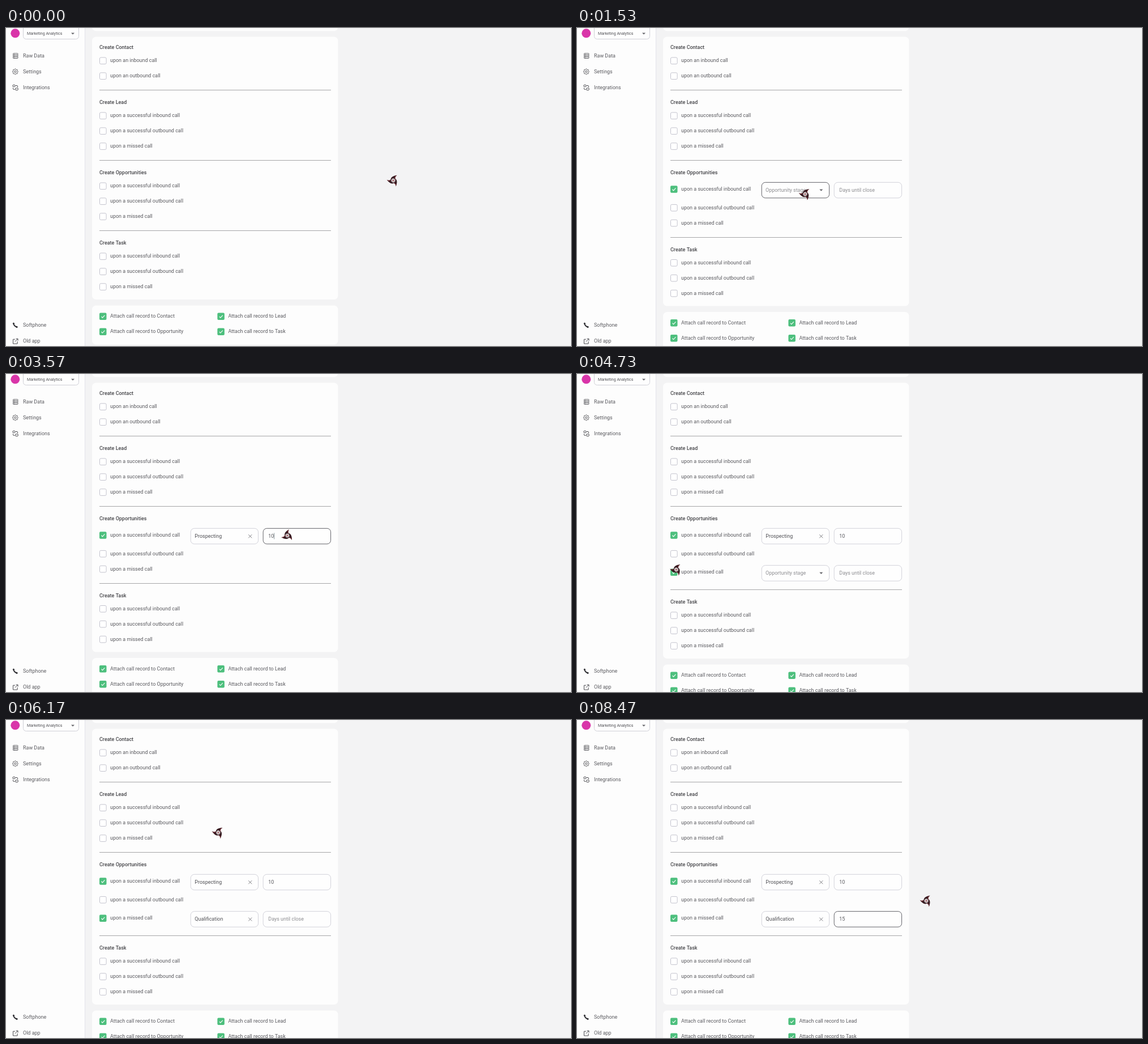
An HTML page with a canvas for the animation above (8.53 s loop, 998 by 561 pixels).

```html
<!DOCTYPE html>
<html lang="en">
<head>
<meta charset="utf-8">
<title>Call automation settings</title>
<style>
html, body { margin: 0; width: 100%; height: 100%; overflow: hidden; background: #f3f3f4; }
canvas { display: block; }
</style>
</head>
<body>
<canvas id="stage" width="998" height="561"></canvas>
<script>
const ctx = document.getElementById('stage').getContext('2d');
const LOOP = 8530;
const GROW = 11.5;
const PAGE = '#f3f3f4', CARD = '#fdfdfd';
const LABEL = '#5a5a5f', TITLE = '#454549', HINT = '#8c8c90';
const LINE = '#d2d2da', FOCUS = '#626268', GREEN = '#4dbf7d';
const STAGES = ['Prospecting', 'Qualification', 'Proposal/Price Qu…', 'Value Proposition',
  'Closed Lost', 'Closed Won', 'Id. Decision Makers', 'Needs Analysis'];
const OUTCOMES = ['upon a successful inbound call', 'upon a successful outbound call', 'upon a missed call'];

// time, x, y, angle in degrees
const POINTER = [
  [30, 684, 269, 0], [800, 171, 280, 240], [900, 171, 280, 240], [1400, 403, 293, 365],
  [1700, 403, 293, 365], [2250, 381, 365, 480], [2370, 381, 367, 480], [2550, 381, 367, 480],
  [2980, 497, 285, 580], [3770, 497, 285, 580], [4560, 171, 345, 840], [4680, 171, 345, 840],
  [5300, 396, 349, 955], [5500, 396, 349, 955], [5950, 367, 188, 1080], [6100, 367, 188, 1080],
  [6560, 490, 352, 1180], [7300, 490, 352, 1180], [8130, 617, 319, 1440]
];

const fields = [
  { checked: 820, focus: 1450, open: 1600, picked: 2340, days: 3000, typed: [3370, 3480],
    blur: 4630, stage: 'Prospecting', value: '10', caretOff: 4630 },
  { checked: 4630, focus: 5250, open: 5400, picked: 6050, days: 6600, typed: [8130, 8240],
    blur: LOOP, stage: 'Qualification', value: '15', caretOff: 8440 }
];

const within = (t, from, to) => t >= from && t < to;

function text(str, x, y, color = LABEL, weight = 400, size = 8.97) {
  ctx.font = `${weight} ${size}px Roboto, sans-serif`;
  ctx.fillStyle = color;
  ctx.fillText(str, x, y + size * 0.355);
}

function box(x, y, w, h, r, fill, stroke) {
  ctx.beginPath();
  ctx.roundRect(x, y, w, h, r);
  if (fill) { ctx.fillStyle = fill; ctx.fill(); }
  if (stroke) { ctx.strokeStyle = stroke; ctx.lineWidth = 1; ctx.stroke(); }
}

function disc(x, y, r, color) {
  ctx.fillStyle = color;
  ctx.beginPath();
  ctx.arc(x, y, r, 0, 7);
  ctx.fill();
}

function stroke(path, color = '#4c4c51', width = 1) {
  ctx.strokeStyle = color;
  ctx.lineWidth = width;
  ctx.stroke(new Path2D(path));
}

function triangle(x, y, up) {
  const d = up ? -1.6 : 1.6;
  ctx.fillStyle = '#67676c';
  ctx.beginPath();
  ctx.moveTo(x - 3, y - d);
  ctx.lineTo(x + 3, y - d);
  ctx.lineTo(x, y + d);
  ctx.fill();
}

function caret(x, y, color = '#8d9a9e') {
  ctx.fillStyle = color;
  ctx.fillRect(x, y - 5.5, 1, 11);
}

function checkbox(x, y, checked) {
  if (checked) {
    box(x, y - 6, 12.5, 12.5, 2, GREEN);
    stroke(`M${x + 3.4} ${y + 0.4}l2 2.2 4-4.4`, '#fff', 1.1);
  } else {
    box(x + 0.5, y - 5.5, 11.6, 11.6, 2, '#fff', '#c3c3cd');
  }
}

function option(label, y, checked, x = 165) {
  checkbox(x, y + 0.4, checked);
  text(label, x + 19, y);
}

function rule(y) {
  ctx.fillStyle = '#a6a6a8';
  ctx.fillRect(165, Math.round(y - 0.5), 409, 1);
}

function sidebar() {
  ctx.fillStyle = CARD;
  ctx.fillRect(0, 0, 139, 561);
  ctx.fillStyle = '#e3e3ea';
  ctx.fillRect(139, 0, 1, 561);

  disc(16.3, 9.3, 8, '#d935a9');

  box(30.5, -8, 98, 27.5, 5, '#fefefe', '#cfcfd6');
  text('Marketing Analytics', 37, 9, '#505055', 400, 7.1);
  triangle(118, 10);
  [['Raw Data', 48.7], ['Settings', 76.7], ['Integrations', 104.7], ['Softphone', 524], ['Old app', 552]]
    .forEach(([label, y]) => text(label, 30, y));

  for (let i = 0; i < 3; i++) {
    box(12.5, 44.8 + i * 3, 8.5, 2.7, 0.7, null, '#5a5a5f');
    ctx.fillStyle = '#5a5a5f';
    ctx.fillRect(14, 45.6 + i * 3, 1, 1);
  }

  ctx.beginPath();
  for (let i = 0; i <= 48; i++) {
    const a = i / 48 * Math.PI * 2, r = 4.4 + 0.7 * Math.cos(a * 8);
    ctx.lineTo(16.4 + r * Math.cos(a), 77 + r * Math.sin(a));
  }
  ctx.moveTo(18.1, 77);
  ctx.arc(16.4, 77, 1.7, 0, 7);
  ctx.strokeStyle = '#4c4c51';
  ctx.lineWidth = 0.9;
  ctx.stroke();

  box(11.8, 100.5, 4.4, 3, 1, null, '#4c4c51');
  box(16.5, 106, 4.8, 3.6, 1, null, '#4c4c51');
  stroke('M17 101.5h2q1.6 0 1.6 1.6v1.6M15.5 108.5h-1.4q-1.6 0-1.6-1.6v-1.6');

  stroke('M13 520.8q1 5 6.3 7.1', '#2e2e32', 1.8);
  stroke('M12.6 520.2l1.8 2.2M17.8 526.7l2.5 1.4', '#2e2e32', 2.6);

  stroke('M16 549.2h-3.5v7.8h7.6v-4M17.6 548.2h3.4v3.4M20.8 548.4l-5 5');
}

function selectField(f, t, y) {
  const open = within(t, f.open, f.picked);
  box(326.2, y - 13.5, 119.4, 27.5, 6.5, '#fefefe', within(t, f.focus, f.picked) ? FOCUS : LINE);
  if (t >= f.picked) {
    text(f.stage, 333.3, y, '#505055');
    stroke(`M428.3 ${y - 2.6}l6 6m0-6l-6 6`, '#717176', 0.9);
  } else {
    text('Opportunity stage', 333, y, HINT);
    triangle(431.3, y + 0.3, open);
  }
}

function daysField(f, t, y) {
  const focused = within(t, f.days, f.blur);
  const value = f.value.slice(0, f.typed.filter(at => t >= at).length);
  box(454.2, y - 13.5, 119.4, 27.5, 6.5, '#fefefe', focused ? FOCUS : LINE);
  text(value || 'Days until close', 463.3, y, value ? '#58585d' : HINT);
  if (focused && t < f.caretOff) caret(463 + value.length * 5.1, y);
}

function dropdown(top) {
  ctx.save();
  ctx.shadowColor = 'rgba(70, 70, 130, .2)';
  ctx.shadowBlur = 16;
  ctx.shadowOffsetY = 2;
  box(326, top, 120, 234, 6, '#fefefe');
  ctx.restore();
  box(333.7, top + 10.2, 104.3, 27.3, 6.5, '#fff', '#707075');
  caret(343, top + 23.5, '#8fb3cf');
  ctx.beginPath();
  ctx.arc(422.6, top + 22.7, 3.2, 0, 7);
  ctx.strokeStyle = '#55555a';
  ctx.lineWidth = 1;
  ctx.stroke();
  stroke(`M425 ${top + 25.1}l3 3`, '#55555a');
  STAGES.forEach((name, i) => text(name, 342.8, top + 56.2 + i * 23, '#505055'));
  box(433, top + 48, 3, 174, 1.5, '#f1f1f4');
  box(433, top + 48, 3, 135, 1.5, '#c8c8ce');
}

function pointerAt(t) {
  const next = POINTER.findIndex(p => p[0] > t);
  if (next === 0) return POINTER[0].slice(1);
  if (next < 0) return POINTER[POINTER.length - 1].slice(1);
  const a = POINTER[next - 1], b = POINTER[next];
  const k = (t - a[0]) / (b[0] - a[0]);
  const e = k * k * (3 - 2 * k);
  return [1, 2, 3].map(i => a[i] + (b[i] - a[i]) * e);
}

function pointer(t) {
  const [x, y, angle] = pointerAt(t);
  const blade = new Path2D('M-2.5-3.5Q2.5-9 11.5 0Q6-2.2 3 3.2L0 0Z');
  ctx.save();
  ctx.translate(x, y);
  ctx.rotate((angle - 54) * Math.PI / 180);
  for (let i = 0; i < 3; i++) {
    ctx.rotate(Math.PI * 2 / 3);
    ctx.fillStyle = '#35191f';
    ctx.fill(blade);
    stroke('M10-.8Q6-2.6 3.4 2', '#8c3038', 0.8);
  }
  disc(0, 0, 4, '#75666a');
  disc(0, 0, 3.2, '#cfc6c7');
  disc(0, 0, 1.3, '#a85860');
  ctx.restore();
}

function group(title, y, labels) {
  text(title, 165, y, TITLE, 500);
  labels.forEach((label, i) => option(label, y + 23.1 + i * 26.9, false));
}

function opportunities(t) {
  text('Create Opportunities', 165, 255, TITLE, 500);
  let y = 278.1, menu = null;
  OUTCOMES.forEach((label, i) => {
    const f = fields[i / 2];
    const on = f && t >= f.checked;
    const rowY = y + (on ? GROW / 2 : 0);
    option(label, rowY, on);
    if (on) {
      selectField(f, t, rowY + 2);
      daysField(f, t, rowY + 2);
      if (within(t, f.open, f.picked)) menu = i ? 108 : 304;
    }
    y += 26.9 + (on ? GROW : 0);
  });
  return menu;
}

function draw(t) {
  const shift = GROW * fields.filter(f => t >= f.checked).length;
  ctx.fillStyle = PAGE;
  ctx.fillRect(0, 0, 998, 561);
  sidebar();
  box(152, -20, 434.5, 25.3, 7, CARD);
  box(152, 15.5, 434.5, 463.5 + shift, 7, CARD);
  box(152, 489.5 + shift, 434.5, 69, 7, CARD);

  group('Create Contact', 34, ['upon an inbound call', 'upon an outbound call']);
  rule(109.5);
  group('Create Lead', 131, OUTCOMES);
  rule(233.5);
  const menu = opportunities(t);
  rule(357.5 + shift);
  group('Create Task', 379 + shift, OUTCOMES);

  ['Contact', 'Lead', 'Opportunity', 'Task'].forEach((name, i) =>
    option('Attach call record to ' + name, 508.2 + shift + (i >> 1) * 26.8, true, i % 2 ? 373.4 : 165));

  if (menu !== null) dropdown(menu);
  pointer(t);
}

function tick(now) {
  draw(now % LOOP);
  requestAnimationFrame(tick);
}
draw(0);
requestAnimationFrame(tick);
</script>
</body>
</html>
```
